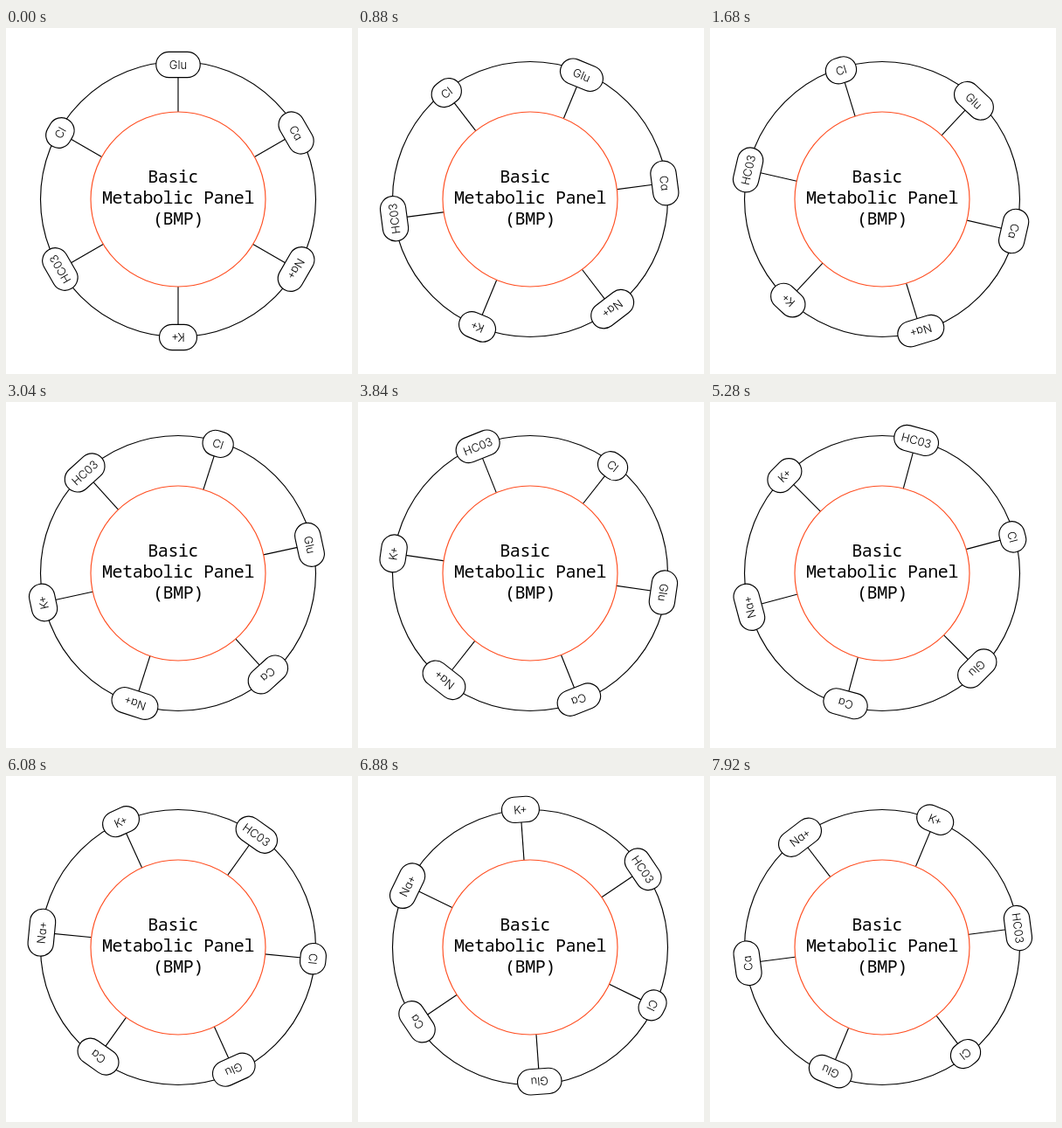
Write an HTML page that moves like this. It is 396x396 px and loops after 8 s.

```html
<!DOCTYPE html>
<html lang="en">
<head>
<meta charset="utf-8">
<title>Basic Metabolic Panel</title>
<style>
  html, body { margin: 0; height: 100%; overflow: hidden; background: #fff; }
  svg { display: block; width: 100vw; height: 100vh; }
  circle, rect, line { fill: #fff; stroke: #000; stroke-width: 1.15; }
  .hub { stroke: #ff4f22; }
  text { text-anchor: middle; fill: #000; }
  .title { font: 300 20px "Noto Sans Mono", monospace; letter-spacing: -.4px; }
  #wheel text { font: 300 13px Inter, sans-serif; font-feature-settings: "cv11"; }
</style>
</head>
<body>
<svg viewBox="0 0 396 396">
  <circle cx="197" cy="196" r="157.5"/>
  <g id="wheel"></g>
  <circle class="hub" cx="197" cy="196" r="100"/>
  <g class="title">
    <text x="191.2" y="177">Basic</text>
    <text x="197" y="201">Metabolic Panel</text>
    <text x="197" y="225">(BMP)</text>
  </g>
</svg>
<script>
  const LOOP = 8000, STEP = 80, DEG_PER_MS = 0.02558;
  const PILL_H = 29.3;
  const wheel = document.getElementById('wheel');

  // label and pill width, clockwise from the top
  const pills = [['Glu', 50.5], ['Ca', 51], ['Na+', 54], ['K+', 43], ['HC03', 51.5], ['Cl', 35.5]];

  // the spokes meet 2px below the pivot, so the wheel wobbles slightly
  wheel.innerHTML = pills.map(([label, w], i) => `
    <g transform="translate(0 2) rotate(${i * 60})">
      <line y1="-90" y2="-156"/>
      <rect x="${-w / 2}" y="${-156 - PILL_H / 2}" width="${w}" height="${PILL_H}" rx="${PILL_H / 2}"/>
      <text y="-151.2">${label}</text>
    </g>`).join('');

  function draw(now) {
    const t = Math.floor(now % LOOP / STEP) * STEP;
    wheel.setAttribute('transform', `translate(197 196) rotate(${t * DEG_PER_MS})`);
    requestAnimationFrame(draw);
  }
  draw(0);
</script>
</body>
</html>
```
